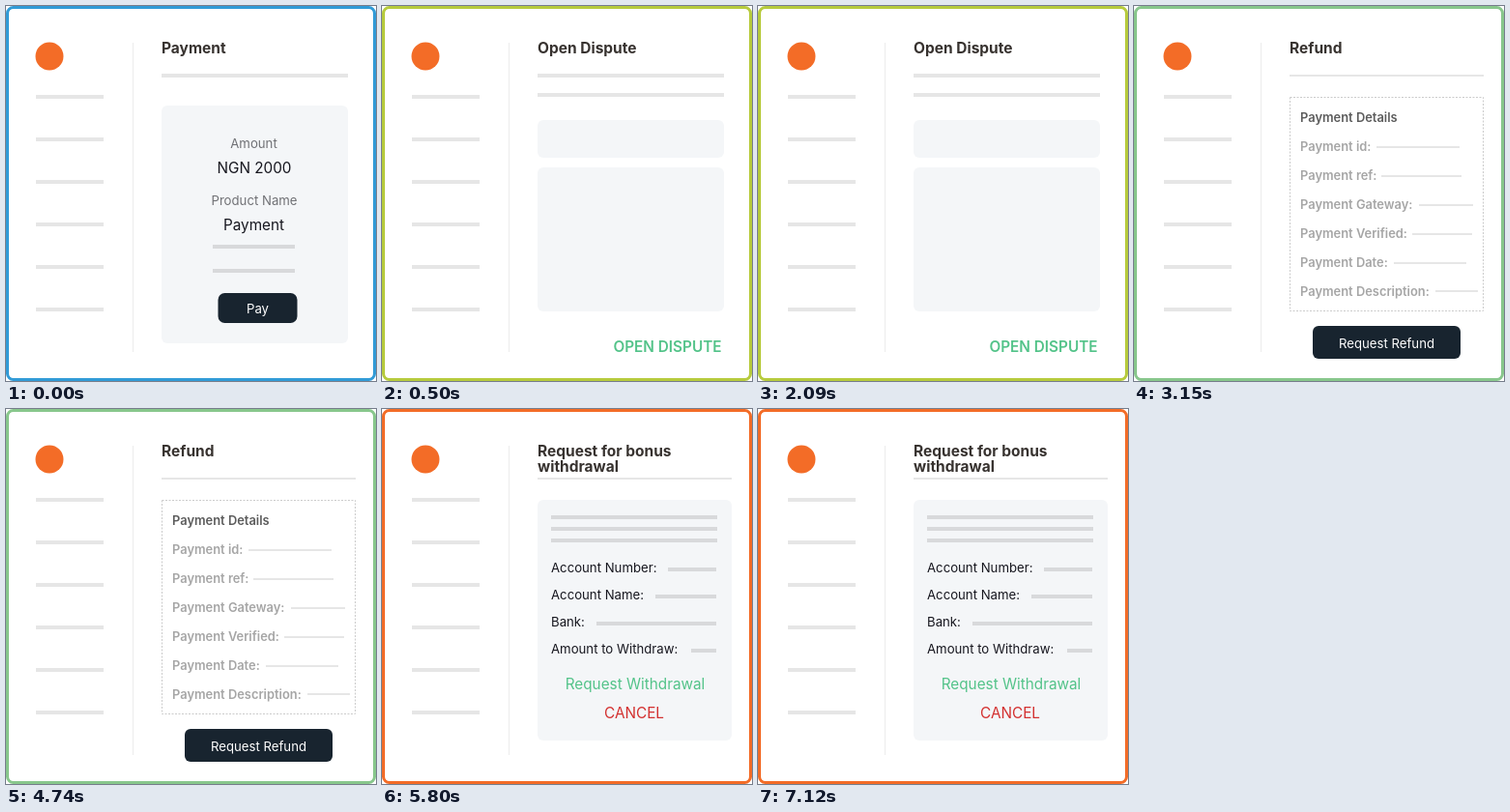
An HTML page that plays this animation: 383x388 px, repeating every 8000 ms.

```html
<!DOCTYPE html>
<html lang="en">
<head>
<meta charset="utf-8">
<title>Payment steps</title>
<style>
  html, body { margin: 0; width: 100%; height: 100%; overflow: hidden; background: #fff; }
  svg { display: block; width: 383px; height: 388px; font: 13.2px Inter, sans-serif; fill: #17171f; }

  .frame { fill: #fff; stroke-width: 3; animation: border 8s step-end infinite; }
  .bar { fill: none; stroke: #e6e6e6; stroke-width: 4; }
  .dark { stroke: #d8d9db; }
  .thin { stroke-width: 2; }
  .card { fill: #f4f6f8; }
  .button { fill: #18242f; }
  .title { font-size: 15.5px; font-weight: 700; fill: #37322f; }
  .mid { text-anchor: middle; }
  .big { font-size: 15.3px; }
  .label { fill: #707175; }
  .white { fill: #fff; }
  .green { fill: #53c389; }
  .details { font-size: 12.9px; font-weight: 600; fill: #a6a6a6; }

  .panel { visibility: hidden; animation: 8s step-end infinite; }
  #pay { animation-name: pay; }
  #dispute { animation-name: dispute; }
  #refund { animation-name: refund; }
  #bonus { animation-name: bonus; }

  @keyframes border {
    0% { stroke: #319bd7; }
    6.25% { stroke: #b7cb3d; }
    39.375% { stroke: #88c78c; }
    72.5%, 100% { stroke: #f36c27; }
  }
  @keyframes pay { 0% { visibility: visible; } 6.25%, 100% { visibility: hidden; } }
  @keyframes dispute { 0% { visibility: hidden; } 6.25% { visibility: visible; } 39.375%, 100% { visibility: hidden; } }
  @keyframes refund { 0% { visibility: hidden; } 39.375% { visibility: visible; } 72.5%, 100% { visibility: hidden; } }
  @keyframes bonus { 0% { visibility: hidden; } 72.5%, 100% { visibility: visible; } }
</style>
</head>
<body>
<svg viewBox="0 0 383 388">
  <rect class="frame" x="1.5" y="1.5" width="380" height="385" rx="6"/>
  <circle cx="45" cy="52" r="14.5" fill="#f36c27"/>
  <path class="bar" d="M31 94h70m-70 44h70m-70 44h70m-70 44h70m-70 44h70m-70 44h70"/>
  <path d="M131.5 38v320" stroke="#ececec"/>

  <g id="pay" class="panel">
    <text class="title" x="161" y="49">Payment</text>
    <path class="bar" d="M161 72h193"/>
    <rect class="card" x="161" y="103" width="193" height="246" rx="6"/>
    <g class="mid">
      <text class="label" x="256.5" y="147">Amount</text>
      <text class="big" x="257" y="173">NGN 2000</text>
      <text class="label" x="257" y="206">Product Name</text>
      <text class="big" x="256.5" y="232">Payment</text>
    </g>
    <path class="bar dark" d="M214 249h85m-85 25h85"/>
    <rect class="button" x="219.5" y="297" width="82" height="31" rx="7"/>
    <text class="mid white" x="260.5" y="318">Pay</text>
  </g>

  <g id="dispute" class="panel">
    <text class="title" x="161" y="49">Open Dispute</text>
    <path class="bar" d="M161 72h193m-193 20h193"/>
    <rect class="card" x="161" y="118" width="193" height="39" rx="6"/>
    <rect class="card" x="161" y="167" width="193" height="149" rx="6"/>
    <text class="mid big green" x="295.5" y="358" font-weight="600">OPEN DISPUTE</text>
  </g>

  <g id="refund" class="panel">
    <text class="title" x="161" y="49">Refund</text>
    <path class="bar thin" d="M161 72h201"/>
    <rect x="161.5" y="94.5" width="200" height="221" fill="none" stroke="#cbcbcb" stroke-dasharray="2 1.5"/>
    <g class="details">
      <text x="172" y="120" fill="#5c5c5c">Payment Details</text>
      <text x="172" y="150">Payment id:</text>
      <text x="172" y="180">Payment ref:</text>
      <text x="172" y="210">Payment Gateway:</text>
      <text x="172" y="240">Payment Verified:</text>
      <text x="172" y="270">Payment Date:</text>
      <text x="172" y="300">Payment Description:</text>
    </g>
    <path class="bar thin" d="M251 146h86M256 176h83M295 206h56M288 236h62M269 266h75M312 295h44"/>
    <rect class="button" x="185" y="331" width="153" height="34" rx="6"/>
    <text class="mid white" x="261.5" y="354">Request Refund</text>
  </g>

  <g id="bonus" class="panel">
    <text class="title" x="161" y="49">Request for bonus</text>
    <text class="title" x="161" y="65">withdrawal</text>
    <path class="bar thin" d="M161 72h201"/>
    <rect class="card" x="161" y="94" width="201" height="249" rx="6"/>
    <path class="bar dark" d="M175 112h172m-172 12h172m-172 12h172M296 166h50M283 194h63M222 222h124M320 250h26"/>
    <text x="175" y="169">Account Number:</text>
    <text x="175" y="197">Account Name:</text>
    <text x="175" y="225">Bank:</text>
    <text x="175" y="253">Amount to Withdraw:</text>
    <text class="mid big green" x="262" y="290">Request Withdrawal</text>
    <text class="mid big" x="261" y="320" fill="#d3302f">CANCEL</text>
  </g>
</svg>
</body>
</html>
```
